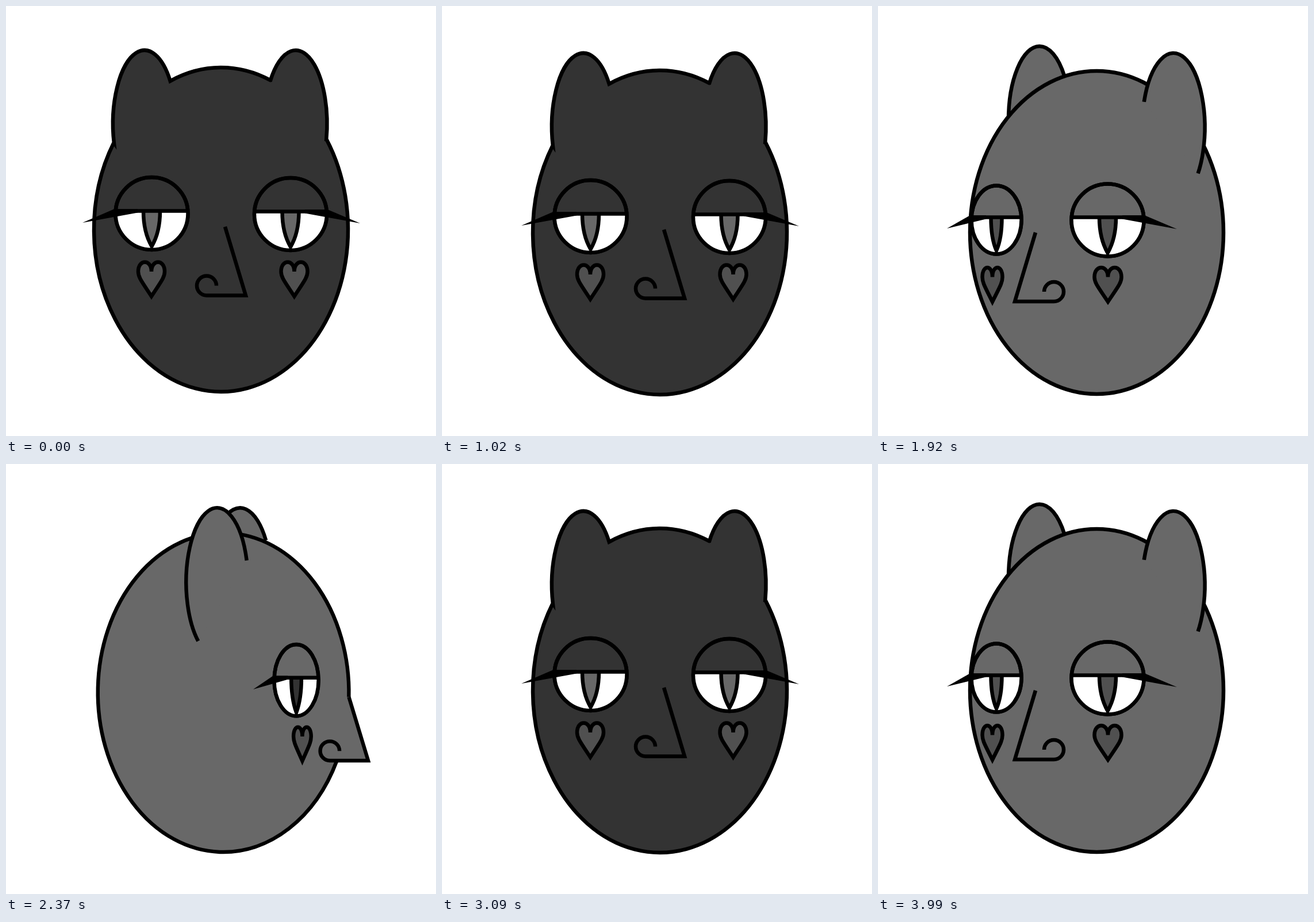
Animation of 748x748 px, one loop 4140 ms. Source, as an HTML page with a canvas:

```html
<!DOCTYPE html>
<html lang="en">
<head>
<meta charset="utf-8">
<title>Turning cat mask</title>
<style>
html, body { margin: 0; width: 100%; height: 100%; overflow: hidden; background: #fff; }
canvas { display: block; width: 748px; height: 748px; }
</style>
</head>
<body>
<canvas id="stage" width="748" height="748"></canvas>
<script>
const ctx = document.getElementById('stage').getContext('2d');
const DARK = '#333', MID = '#505050', LIGHT = '#686868';

function paint(fill) {
  if (fill) { ctx.fillStyle = fill; ctx.fill(); }
  ctx.stroke();
}

function poly(points) {
  ctx.beginPath();
  points.forEach(p => ctx.lineTo(...p));
}

// Adds the clockwise part of an ellipse between the directions of two points.
function arcBetween([cx, cy, rx, ry], from, to) {
  const angle = ([x, y]) => Math.atan2((y - cy) / ry, (x - cx) / rx);
  ctx.ellipse(cx, cy, rx, ry, 0, angle(from), angle(to));
}

function oval([cx, cy, rx, ry], fill) {
  ctx.beginPath();
  ctx.ellipse(cx, cy, rx, ry, 0, 0, 2 * Math.PI);
  paint(fill);
}

function ear(shape, from, to, fill) {
  ctx.beginPath();
  arcBetween(shape, from, to);
  paint(fill);
}

function heart(cx, top, w, fill) {
  const y = top + 16.5;
  ctx.beginPath();
  ctx.moveTo(cx, y);
  ctx.bezierCurveTo(cx, y - 22, cx - w, y - 22, cx - w, y);
  ctx.bezierCurveTo(cx - w, y + 10, cx - w * 0.74, y + 17, cx, y + 43);
  ctx.bezierCurveTo(cx + w * 0.74, y + 17, cx + w, y + 10, cx + w, y);
  ctx.bezierCurveTo(cx + w, y - 22, cx, y - 22, cx, y);
  paint(fill);
}

function eye(shape, lid, pupilW, pupil, face, tip, cornerX, lowX) {
  const [cx, cy, rx, ry] = shape;
  const bottom = cy + ry - 6;
  oval(shape, face);
  ctx.save();
  ctx.clip();
  ctx.fillStyle = '#fff';
  ctx.fillRect(cx - rx, lid, 2 * rx, 2 * ry);
  ctx.beginPath();
  ctx.moveTo(cx - pupilW, lid);
  ctx.quadraticCurveTo(cx - pupilW, lid + 37, cx, bottom);
  ctx.quadraticCurveTo(cx + pupilW, lid + 37, cx + pupilW, lid);
  paint(pupil);
  poly([[cx - rx, lid], [cx + rx, lid]]);
  paint();
  ctx.restore();
  oval(shape);
  poly([tip, [cornerX, lid - 3.2], [lowX, lid - 3.2], [lowX, lid + 3]]);
  ctx.fillStyle = '#000';
  ctx.fill();
}

// Bridge, tip and curled nostril; dir is 1 when the tip points right.
function nose(bridge, tip, curlX, dir) {
  poly([bridge, tip, [curlX, tip[1]]]);
  const end = dir > 0 ? 2 * Math.PI : -Math.PI;
  ctx.arc(curlX, tip[1] - 17, 17, Math.PI / 2, end, dir < 0);
  paint();
}

function front() {
  const head = [374, 389, 221, 282];
  const a = [188, 238], b = [286, 130], c = [460, 129], d = [558, 233];
  ctx.beginPath();
  arcBetween([241, 205, 55, 128], a, b);
  arcBetween(head, b, c);
  arcBetween([504, 205, 54.5, 128], c, d);
  arcBetween(head, d, a);
  ctx.closePath();
  paint(DARK);
  eye([253.5, 361, 63, 63], 356.5, 14.5, LIGHT, DARK, [133, 377], 188, 229);
  eye([495, 362, 63, 63], 357.5, 14.5, LIGHT, DARK, [616, 378], 560, 520);
  heart(253, 445.5, 23, MID);
  heart(501.5, 445.5, 23, MID);
  nose([381, 384], [417, 503.5], 349, 1);
}

function frontLow() {
  ctx.save();
  ctx.translate(5, 5);
  front();
  ctx.restore();
}

function threeQuarter() {
  ear([281, 199, 54, 129], [227, 200], [324, 122], LIGHT);
  oval([380.5, 394, 220.5, 281], LIGHT);
  ear([514, 211, 54.5, 129], [463, 167], [557, 292], LIGHT);
  eye([206, 372, 43.5, 59.5], 367.5, 9.5, MID, LIGHT, [120, 387], 160, 188);
  eye([399.5, 372.5, 63, 63], 367.5, 14.5, MID, LIGHT, [520, 388], 464, 425);
  heart(199, 455, 17.5, MID);
  heart(400, 455, 23.5, MID);
  nose([274, 394], [238, 514], 306, -1);
}

function profile() {
  ear([351, 200, 55, 131], [306, 127], [396, 127], LIGHT);
  const head = [380.5, 394, 221, 281], brow = [159.5, 402], chin = [181, 514];
  ctx.beginPath();
  arcBetween(head, brow, chin);
  ctx.lineTo(125, 514);
  ctx.lineTo(...brow);
  ctx.fillStyle = LIGHT;
  ctx.fill();
  ctx.beginPath();
  arcBetween(head, brow, chin);
  paint();
  nose(brow, [125.5, 514], 193, -1);
  ear([391.5, 200, 54.5, 131], [340, 162], [425, 304], LIGHT);
  eye([252, 372.5, 39, 63], 368, 9, DARK, LIGHT, [328, 388.5], 293, 267);
  heart(241.5, 455, 15.5, MID);
}

function back() {
  poly([[126, 391.5], [162, 370], [164, 382]]);
  ctx.fillStyle = '#000';
  ctx.fill();
  poly([[167, 448], [146.5, 515], [190, 515]]);
  paint(MID);
  ear([478, 205, 53, 128], [435, 128], [531, 205], MID);
  oval([378, 397, 218, 277], MID);
  ear([292, 198, 53.5, 128], [243.5, 253], [344, 167], MID);
}

// Mirrors a left-facing pose so that its leftmost point lands on the right edge.
function mirror(pose, left, right, scale) {
  return () => {
    ctx.save();
    ctx.translate(right + left * scale, 678 * (1 - scale));
    ctx.scale(-scale, scale);
    pose();
    ctx.restore();
  };
}

const threeQuarterRight = mirror(threeQuarter, 120, 638, 0.993);
const profileRight = mirror(profile, 121, 634.5, 0.988);
const backRight = mirror(back, 126, 630, 0.99);

const LOOP = 2070;
const steps = [
  [0, front], [150, threeQuarterRight], [300, profileRight], [450, backRight],
  [600, back], [750, profile], [870, profile, threeQuarter], [900, threeQuarter],
  [1020, frontLow], [1170, threeQuarterRight], [1320, profileRight],
  [1470, backRight], [1620, back], [1770, profile], [1920, threeQuarter]
];

function draw(time) {
  const t = time % LOOP;
  const [, ...poses] = steps.filter(s => s[0] <= t).pop();
  ctx.fillStyle = '#fff';
  ctx.fillRect(0, 0, 748, 748);
  ctx.strokeStyle = '#000';
  ctx.lineWidth = 6.5;
  poses.forEach(pose => pose());
}

const start = performance.now();
function tick() {
  draw(performance.now() - start);
  requestAnimationFrame(tick);
}
tick();
</script>
</body>
</html>
```
